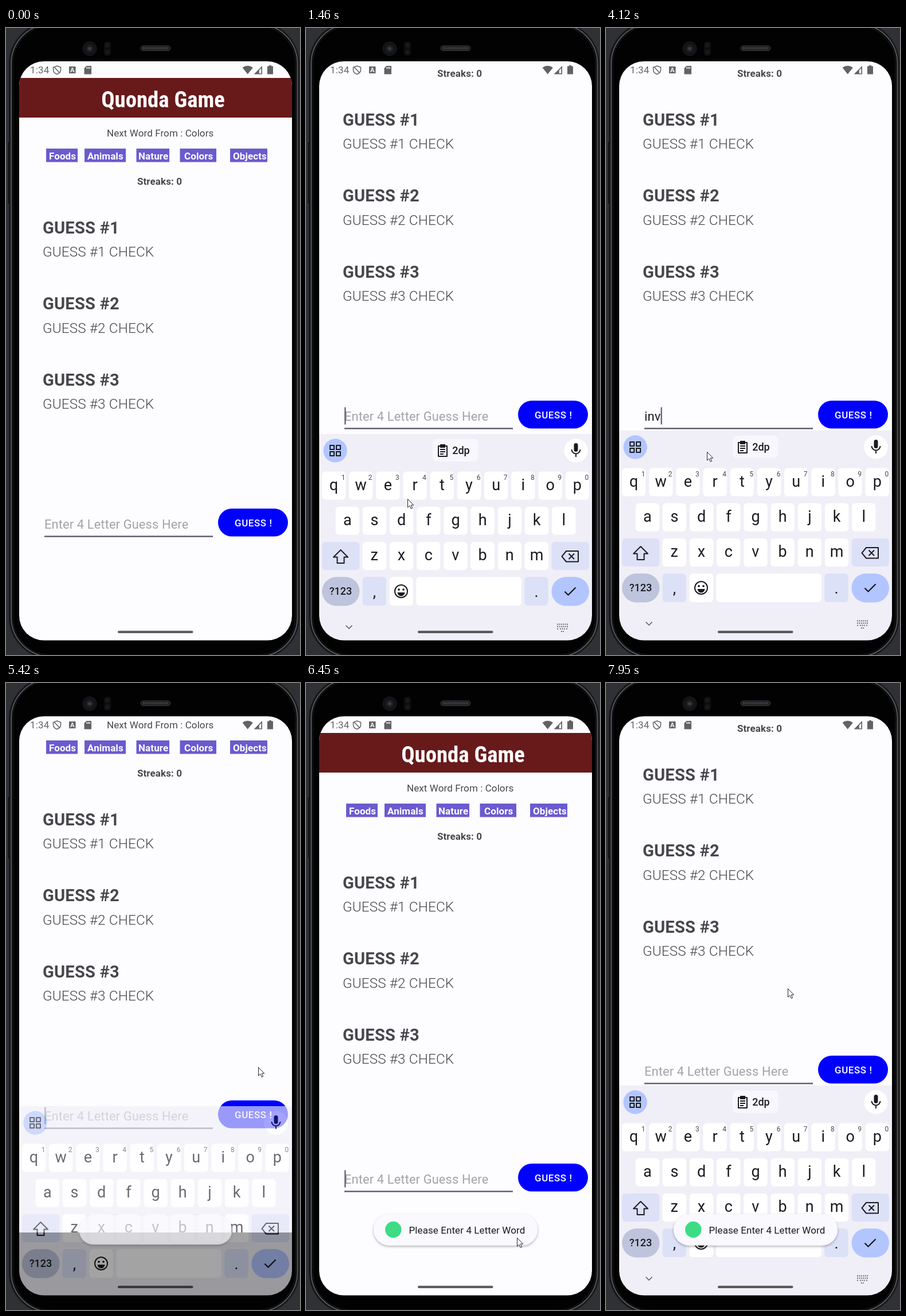
An HTML page for the animation above (8000 ms loop, 513x1092 px).

```html
<!DOCTYPE html>
<html lang="en">
<head>
<meta charset="utf-8">
<title>Word guessing app</title>
<style>
  html, body { margin: 0; width: 100%; height: 100%; overflow: hidden; background: #2f3135; }
  svg { display: block; width: 100%; height: 100%; }
  text { font: 16.97px Roboto, sans-serif; letter-spacing: .0065em; fill: #48464c; white-space: pre; }
  .bold { font-weight: 700; }
  #title { font: 700 38.8px "Roboto Condensed", Roboto, sans-serif; font-stretch: 75%; letter-spacing: 0; fill: #fff; text-anchor: middle; }
  .guess { font-size: 29.1px; font-weight: 700; }
  .check { font-size: 24.24px; font-weight: 300; }
  .chip { font-weight: 700; fill: #fff; }
  .field { font-size: 21.82px; }
  #kb text { letter-spacing: 0; fill: #1a1b20; text-anchor: middle; }
  #kb .key { font-size: 27px; }
  #kb .digit { font-size: 12px; fill: #45464f; }
  .line { fill: none; stroke: #1a1b20; stroke-width: 2; stroke-linejoin: round; }
</style>
</head>
<body>
<svg viewBox="0 0 513 1092">
  <defs>
    <clipPath id="screen"><rect x="23" y="58" width="476" height="1008.5" rx="43"/></clipPath>
    <filter id="shadow" x="-10%" y="-30%" width="120%" height="170%">
      <feDropShadow dx="0" dy="2" stdDeviation="2" flood-opacity=".3"/>
    </filter>
  </defs>

  <!-- phone body -->
  <rect x="2" y="197" width="5" height="110" rx="2" fill="#17181a" stroke="#4a4c50"/>
  <rect x="6" y="-10" width="505" height="1108" rx="72" fill="#08090a" stroke="#1a1b1d" stroke-width="2"/>
  <rect x="9" y="-7" width="499.5" height="1102" rx="69" fill="none" stroke="#55575b" stroke-width="2"/>
  <rect x="12" y="-4" width="493" height="1096" rx="66" fill="#020203" stroke="#1c1d1f"/>
  <circle cx="146" cy="36" r="12" fill="#121315" stroke="#1d1e20"/>
  <circle cx="146" cy="36" r="7" fill="#1c1e22"/>
  <circle cx="146" cy="36" r="3" fill="#393d44"/>
  <rect x="171" y="24" width="12" height="24" rx="4" fill="#0d0e0f"/>
  <circle cx="177" cy="30" r="4" fill="#18191b"/>
  <circle cx="177" cy="42" r="4" fill="#18191b"/>
  <rect x="235" y="31" width="52" height="8.5" rx="4.2" fill="#1d1e20" stroke="#3c3d40"/>
  <path d="M239 35.3H284" stroke="#4a4b4e" stroke-width="4" stroke-dasharray="1.5 1.5"/>

  <g clip-path="url(#screen)">
    <rect x="23" y="58" width="476" height="1009"/>

    <g id="app">
      <rect x="23" y="58" width="476" height="1009" fill="#fdfcff"/>
      <rect x="23" y="87" width="476" height="69" fill="#681a1b"/>
      <text id="title" x="274" y="137.5">Quonda Game</text>
      <text x="176" y="189">Next Word From : Colors</text>
      <g id="chips"></g>
      <text class="bold" x="229" y="273">Streaks: 0</text>
      <g id="guesses"></g>
      <text id="hint" class="field" x="67" y="872" style="fill:#a4a3a8">Enter 4 Letter Guess Here</text>
      <text id="typed" class="field" x="67" y="872" style="fill:#1b1b1f"></text>
      <rect x="67" y="884.3" width="294" height="2.4" fill="#5d5972"/>
      <rect id="caret" y="848.5" width="2.2" height="30" fill="#5d5972"/>
      <rect x="370" y="837" width="122" height="48.5" rx="24.2" fill="#00f"/>
      <text x="399" y="868" style="font-weight:500;fill:#fff;letter-spacing:.035em">GUESS !</text>
    </g>

    <g id="kb">
      <rect x="23" y="701" width="476" height="366" fill="#f0eff7"/>
      <circle cx="51" cy="730" r="20.7" fill="#b2c5ff"/>
      <path class="line" d="M42 721h7v7h-7zM53 721h7v7h-7zM42 732h7v7h-7zM53 732h7v7h-7z"/>
      <g id="clip">
        <rect x="221" y="710" width="79.5" height="39" rx="8" fill="#f8f7fd"/>
        <path class="line" d="M231 722h15v18h-15zM234 728h9M234 732h9M234 736h6"/>
        <path d="M234 719h9v6h-9z" fill="#1a1b20"/>
        <text x="270.5" y="736" style="font-size:18px;font-weight:500">2dp</text>
      </g>
      <circle cx="471" cy="730" r="20.7" fill="#fff"/>
      <rect x="467.5" y="717" width="7" height="15" rx="3.5" fill="#1a1b20"/>
      <path class="line" d="M463.5 728a7.5 7.5 0 0 0 15 0M471 735.5v5.500"/>
      <g id="keys"></g>
      <path class="line" d="M60.5 903l12.5 12.5h-6.5v10.5h-12v-10.5h-6.5z"/>
      <path class="line" d="M454 905h21v18.5h-21l-7.5-9.2zM458.5 909.5l9.5 9.5M468 909.5l-9.5 9.5"/>
      <circle class="line" cx="166" cy="975" r="11"/>
      <circle cx="162" cy="972" r="1.8"/>
      <circle cx="170" cy="972" r="1.8"/>
      <path d="M159.500 977h13a6.5 6.5 0 0 1-13 0z" fill="#1a1b20"/>
      <path class="line" d="M451.5 975.5l6 6 13-13" style="stroke-width:2.3"/>
      <path class="line" d="M69.5 1034.5l5.5 5.5 5.5-5.5" style="stroke:#5c5d65;stroke-width:1.6"/>
      <path d="M438 1032.5h19M438 1036.5h19M438 1040.5h3M454 1040.5h3M443 1040.5h9M445 1045h5" stroke="#6a6b73" stroke-width="2" stroke-dasharray="2 1.4"/>
    </g>

    <!-- status bar -->
    <g fill="#000" opacity=".61">
      <text x="42" y="79" style="font-size:17px;letter-spacing:.01em;fill:#000">1:34</text>
      <path d="M89 66l6.5 2.5v4.5q0 5-6.5 7.5q-6.5-2.5-6.5-7.5v-4.5zM84.5 68.5l9 9.5" fill="none" stroke="#000" stroke-width="1.5"/>
      <path fill-rule="evenodd" d="M110 67h11.5v12h-11.5zM115 69l-3 8h1.5l.6-1.8h3.3l.6 1.8h1.5l-3-8zM115.8 71l1.1 3h-2.2z"/>
      <path fill-rule="evenodd" d="M140.5 66h8.5v14.5h-12.5v-10.5zM140.5 68v3h1.4v-3zM143 68v3h1.4v-3zM145.5 68v3h1.4v-3z"/>
      <path d="M412.5 69q9.2-6.5 18.4 0l-9.2 11.5z"/>
      <path fill-rule="evenodd" d="M447 66v14.5h-14.5zM445.3 70v9h-3.5v-5.5z"/>
      <path d="M459 65h4v1.5h3v14h-10v-14h3z"/>
    </g>

    <rect x="195" y="1049.7" width="131.5" height="4.3" rx="2.1" opacity=".63"/>

    <g id="toast">
      <rect x="118" y="925" width="286" height="54.5" rx="27.2" fill="#f9f9fe" filter="url(#shadow)"/>
      <g id="message">
        <circle cx="152.3" cy="952" r="14.2" fill="#3ddc84"/>
        <text x="179.5" y="958.5" style="fill:#1b1b1f">Please Enter 4 Letter Word</text>
      </g>
    </g>
  </g>

  <path id="mouse" d="M.5.5v14.5l3.4-3.1 2.3 5.3 2.4-1-2.3-5.2h4.5z" fill="#fff" stroke="#222" stroke-width="1"/>
</svg>

<script>
const $ = id => document.getElementById(id);
const clamp = u => Math.min(1, Math.max(0, u));
const easeOut = u => 1 - (1 - clamp(u)) ** 2;
const rect = (x, y, w, h, r, fill) =>
  `<rect x="${x}" y="${y}" width="${w}" height="${h}" rx="${r}" fill="${fill}"/>`;
const text = (x, y, cls, s) => `<text x="${x}" y="${y}" class="${cls}">${s}</text>`;

// category: left, width, text left
$('chips').innerHTML = [
  ['Foods', 70, 55, 75], ['Animals', 137, 72, 142], ['Nature', 227.5, 57.5, 231],
  ['Colors', 303.5, 63.5, 311], ['Objects', 391, 65, 396]
].map(([s, x, w, tx]) => rect(x, 210, w, 23.5, 0, '#6a5bce') + text(tx, 228.7, 'chip', s)).join('');

$('guesses').innerHTML = [1, 2, 3].map((n, i) =>
  text(64, 357.5 + i * 132.6, 'guess', `GUESS #${n}`) +
  text(64, 398 + i * 132.6, 'check', `GUESS #${n} CHECK`)).join('');

const PITCH = 47.2, PALE = '#dde1f8';
const rows = [['qwertyuiop', 48.5], ['asdfghjkl', 72.3], ['zxcvbnm', 119.3]];
$('keys').innerHTML = rows.map(([letters, x0], r) => [...letters].map((c, i) => {
  const x = x0 + i * PITCH, y = 766.5 + r * 61.2;
  return rect(x - 20.7, y, 41.4, 49, 6, '#fff') + text(x, y + 32.5, 'key', c) +
    (r ? '' : text(x + 16.5, y + 14, 'digit', (i + 1) % 10));
}).join('')).join('') +
  rect(28, 889, 65.5, 49, 6, PALE) + rect(428.5, 889, 65.5, 49, 6, PALE) +
  rect(28, 950, 65.5, 50.5, 25, '#bec4dc') + rect(98.5, 950, 41.4, 50, 6, PALE) +
  rect(145.5, 950, 41.4, 50, 6, '#fff') + rect(192.2, 950, 183.6, 50, 6, '#fff') +
  rect(381.2, 950, 41.4, 50, 6, PALE) + rect(428.5, 950, 65.5, 50.5, 25, '#b2c5ff') +
  '<text x="60.5" y="981" style="font-size:18px;font-weight:500">?123</text>' +
  text(119.3, 985, 'key', ',') + text(402, 985, 'key', '.');

// The screen refreshes every 70 ms, counted from these moments.
const ticks = [0, 170, 1060, 1460, 2020, 3240, 4120, 4650, 5420, 6450, 7200, 7460, 7950];
const last = (list, t) => list.filter(a => a <= t).pop();
const hold = t => {
  const a = last(ticks, t);
  return a + 70 * Math.floor((t - a) / 70);
};

const blinkStarts = [-640, 1210, 3240, 3420, 4120, 5070, 7410];

// time, x, y
const path = [
  [170, 406, 1069], [450, 290, 940], [790, 173, 862], [1270, 173, 862], [1460, 177, 820],
  [1820, 236, 784], [2020, 236, 784], [2440, 176, 738], [4620, 176, 738], [5000, 440, 669],
  [5480, 440, 669], [6240, 374, 940], [6450, 368, 966], [6560, 350, 974], [7050, 173, 862],
  [7460, 173, 862], [7940, 317, 532]
];
function mouseAt(t) {
  const i = path.findIndex(p => p[0] > t);
  if (i < 0) return path[path.length - 1].slice(1);
  const [t0, x0, y0] = path[i - 1], [t1, x1, y1] = path[i];
  const u = (t - t0) / (t1 - t0), e = u * u * (3 - 2 * u);
  return [x0 + (x1 - x0) * e, y0 + (y1 - y0) * e];
}

// pan: app shift, up: keyboard height, alpha: keyboard opacity (all 0..1)
function keyboardAt(t) {
  if (t > 5000 && t < 7000) {
    const u = clamp((t - 5354) / 210);
    return { pan: 1 - easeOut((t - 5355) / 275), up: 1 - u * u, alpha: clamp(1 - 1.15 * u) };
  }
  const start = t < 5000 ? 1178 : 7378, u = (t - start) / 322;
  return { pan: easeOut((t - start - 20) / 275), up: easeOut(u), alpha: clamp(1.35 * u) };
}

function draw(now) {
  const t = hold(now % 8000);

  const { pan, up, alpha } = keyboardAt(t);
  $('app').setAttribute('transform', `translate(0 ${Math.round(-188 * pan)})`);
  $('kb').setAttribute('transform', `translate(0 ${Math.round(366 * (1 - up))})`);
  $('kb').setAttribute('opacity', alpha);
  $('clip').setAttribute('opacity', t < 5140 || t > 7500 ? 1 : 0);

  const typed = t < 3240 || t >= 5070 ? '' : t < 3420 ? 'i' : t < 4120 ? 'in' : 'inv';
  $('typed').textContent = typed;
  $('hint').setAttribute('opacity', typed ? 0 : 1);
  $('caret').setAttribute('x', 67.2 + (typed ? $('typed').getComputedTextLength() : 0));
  $('caret').setAttribute('opacity', (t - last(blinkStarts, t)) % 1000 < 500 ? 1 : 0);

  const grow = Math.max(.934, .9 + .1 * easeOut((t - 5385) / 200));
  $('toast').setAttribute('opacity', clamp((t - 5340) / 130));
  $('toast').setAttribute('transform', `translate(261 956) scale(${grow}) translate(-261 -956)`);
  $('message').setAttribute('opacity', clamp((t - 5420) / 140));

  $('mouse').setAttribute('opacity', t < 170 ? 0 : 1);
  if (t >= 170) $('mouse').setAttribute('transform', `translate(${mouseAt(t)})`);
}

const begin = performance.now();
(function loop() {
  draw(performance.now() - begin);
  requestAnimationFrame(loop);
})();
</script>
</body>
</html>
```
